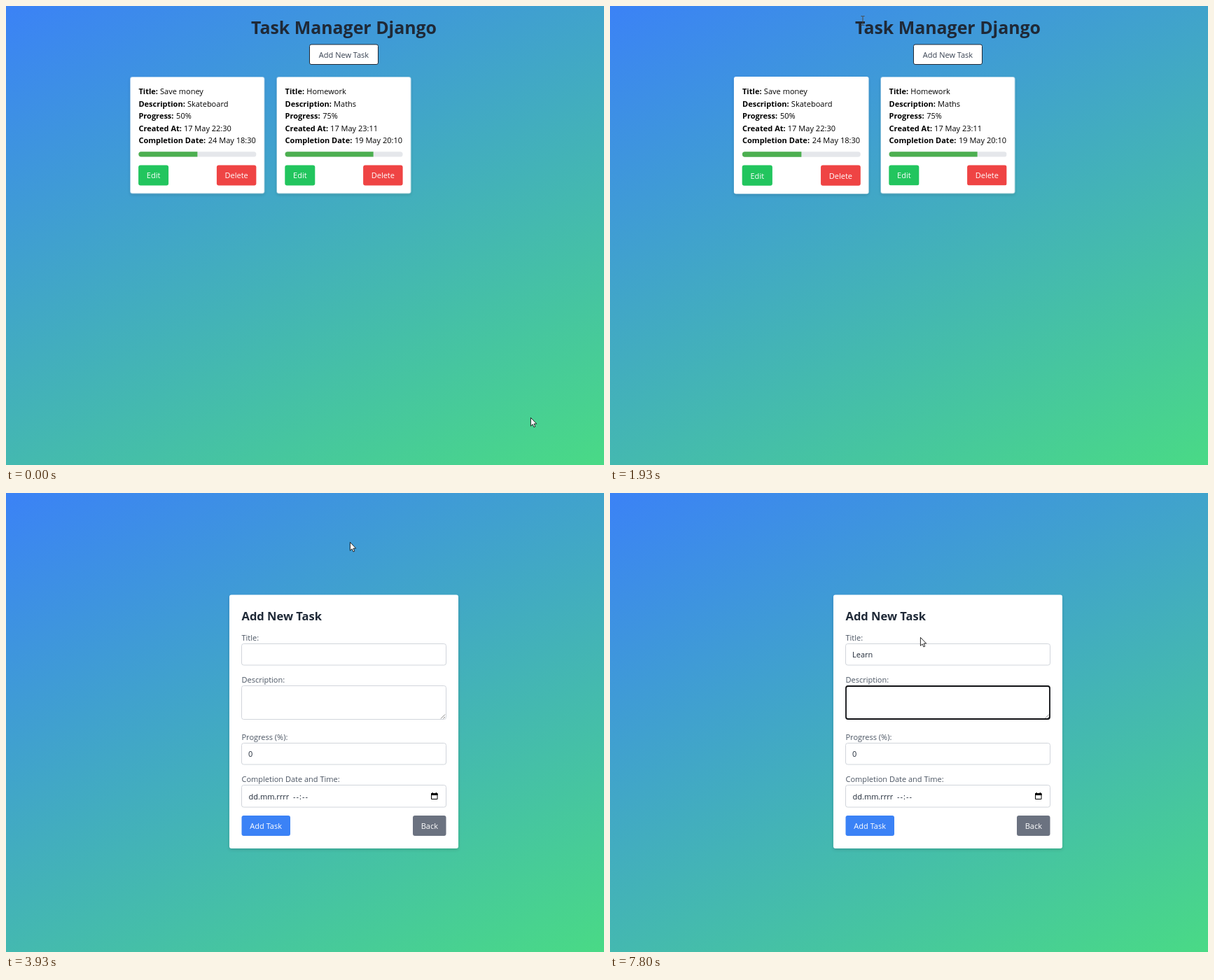
Animation of 854 by 656 pixels, one loop 8 s. Source, as an HTML page:

```html
<!DOCTYPE html>
<html lang="en">
<head>
<meta charset="utf-8">
<title>Task Manager</title>
<style>
  html, body { margin: 0; width: 100%; height: 100%; overflow: hidden; }
  body { background: linear-gradient(155deg, #3b82f6, #4ade80) 0 0 / 965px 656px no-repeat; }
  svg { display: block; }
  text { font: 11px "Open Sans", "Noto Sans", sans-serif; white-space: pre; }
  .mid { text-anchor: middle; }
  .white { fill: #fff; }
  .bold { font-weight: 700; }
  .h1 { font-size: 24.9px; font-weight: 700; fill: #1f2937; }
  .h2 { font-size: 16.5px; font-weight: 700; fill: #1f2937; }
  .label { fill: #4b5563; }
  .value { fill: #1f2937; }
  .field { fill: #fff; stroke: #d1d5db; }
  .ring { fill: none; stroke: #101114; stroke-width: 1.8; }
  .panel { fill: #fff; filter: drop-shadow(0 2px 2px rgba(0, 0, 0, .14)); }

  .card { transform-origin: 95.8px 83.3px; animation: grow 8s infinite; }
  .card .panel { animation: lift 8s infinite; }
  .late, .late .panel { animation-delay: .985s; }
  @keyframes grow {
    0%, 14.875%, 25.525%, 100% { transform: scale(1); animation-timing-function: cubic-bezier(.4, 0, .2, 1); }
    18.625%, 21.775% { transform: scale(1.05); animation-timing-function: cubic-bezier(.4, 0, .2, 1); }
  }
  @keyframes lift {
    0%, 14.875%, 25.525%, 100% { filter: drop-shadow(0 2px 2px rgba(0, 0, 0, .14)); }
    18.625%, 21.775% { filter: drop-shadow(0 6px 5px rgba(0, 0, 0, .16)); }
  }

  .add rect { fill: #fff; stroke: #1f2937; animation: darken 8s infinite; }
  .add text { fill: #374151; animation: lighten 8s infinite; }
  @keyframes darken { 0%, 35% { fill: #fff; } 36.3%, 100% { fill: #1f2937; } }
  @keyframes lighten { 0%, 35% { fill: #374151; } 36.3%, 100% { fill: #fff; } }

  #caret { animation: caret 8s step-end infinite; }
  @keyframes caret {
    0% { opacity: 0; transform: none; }
    57.5% { opacity: 1; transform: none; }
    64.125% { opacity: 0; transform: none; }
    70.875% { opacity: 1; transform: none; }
    75.875% { opacity: 1; transform: translateX(5.5px); }
    79.125% { opacity: 1; transform: translateX(11.7px); }
    81.625% { opacity: 1; transform: translateX(17.7px); }
    85% { opacity: 1; transform: translateX(22.1px); }
    87.5% { opacity: 1; transform: translateX(28.6px); }
    90.875% { opacity: 1; transform: translateY(60px); }
    97.5%, 100% { opacity: 0; transform: translateY(60px); }
  }

  #pointer { animation: point 8s linear infinite; }
  @keyframes point {
    0%, .5% { transform: translate(749px, 588px); animation-timing-function: cubic-bezier(.4, .1, .7, .95); }
    10.9% { transform: translate(49px, 264px); }
    11.7% { transform: translate(46px, 254px); animation-timing-function: ease-in; }
    14.875% { transform: translate(178px, 165px); }
    15.875% { transform: translate(255px, 129px); animation-timing-function: ease-out; }
    17.8%, 20% { transform: translate(276px, 122px); animation-timing-function: ease-in; }
    21.775% { transform: translate(332px, 101px); }
    23.3% { transform: translate(357px, 29px); animation-timing-function: ease-out; }
    24.125% { transform: translate(361px, 21px); animation-timing-function: ease-in; }
    27.19% { transform: translate(405px, 101px); animation-timing-function: ease-out; }
    30%, 32% { transform: translate(465px, 143px); animation-timing-function: ease-in; }
    34.1% { transform: translate(487px, 101px); animation-timing-function: ease-out; }
    36.5%, 49.2% { transform: translate(491px, 70px); animation-timing-function: ease-in-out; }
    56%, 61% { transform: translate(448px, 229px); animation-timing-function: ease-in-out; }
    64%, 100% { transform: translate(443px, 206px); }
  }
</style>
</head>
<body>
<svg width="854" height="656" viewBox="0 0 854 656">
  <g id="list">
    <text class="h1 mid" x="482.5" y="39.5">Task Manager Django</text>
    <g class="add">
      <rect x="433.5" y="55" width="98" height="28.5" rx="2.5"/>
      <text class="mid" x="482.5" y="74">Add New Task</text>
    </g>
    <g id="cards"></g>
  </g>

  <g id="form">
    <rect class="panel" x="319" y="145.5" width="327" height="362.5" rx="3"/>
    <text class="h2" x="336.5" y="182">Add New Task</text>

    <text class="label" x="336.5" y="211">Title:</text>
    <rect class="field" x="336.5" y="215.5" width="292" height="30.5" rx="3"/>
    <text class="value" id="typed" x="346" y="235"></text>

    <text class="label" x="336.5" y="271">Description:</text>
    <rect class="field" x="336.5" y="275.5" width="292" height="48" rx="3"/>
    <path d="M621 322.5l6-6M624.5 322.5l2.5-2.5" stroke="#777" stroke-width=".9"/>

    <text class="label" x="336.5" y="353">Progress (%):</text>
    <rect class="field" x="336.5" y="357.5" width="292" height="30.5" rx="3"/>
    <text class="value" x="346" y="377">0</text>

    <text class="label" x="336.5" y="413">Completion Date and Time:</text>
    <rect class="field" x="336.5" y="417.5" width="292" height="31.5" rx="3"/>
    <text class="value" x="346.5" y="437.5">dd.mm.rrrr</text>
    <text class="value" x="410" y="437.5" letter-spacing="1">--:--</text>
    <path d="M607.5 430h8.5v7.5h-8.5z" fill="none" stroke="#000"/>
    <path d="M607 429h9.5v3H607zM608.5 428h1.3v2h-1.3zM613.7 428h1.3v2h-1.3z"/>

    <rect x="336.5" y="461" width="69.5" height="29" rx="3" fill="#3b82f6"/>
    <text class="white mid" x="371.2" y="480">Add Task</text>
    <rect x="581" y="461" width="47.5" height="29" rx="3" fill="#6b7280"/>
    <text class="white mid" x="604.8" y="480">Back</text>

    <rect class="ring" id="titleRing" x="337" y="216" width="291" height="29.5" rx="3"/>
    <rect class="ring" id="textRing" x="337" y="276" width="291" height="47" rx="3"/>
    <rect id="caret" x="346" y="223" width="1" height="15"/>
  </g>

  <g id="pointer">
    <path id="arrow" d="M.4.4V12.3L3.1 9.8 4.9 13.9 6.8 13.1 5 9.1H8.7z" fill="#fff" stroke="#111" stroke-width=".9"/>
    <path id="beam" d="M-2.5-6.5h2L0-6l.5-.5h2M0-6V6M-2.5 6.5h2L0 6l.5.5h2" fill="none" stroke="#4a4a4a"/>
    <path id="hand" d="M2.6 8.5V.6a1.1 1.1 0 0 1 2.2 0V5a1 1 0 0 1 2 .1a1 1 0 0 1 2 .4a1 1 0 0 1 2 .6V10.5q0 2-1.2 3V15H3.6V13.6Q1.5 11.5-.2 8.6q-.3-1.6 1.3-1.2z" fill="#fff" stroke="#111" stroke-width=".9"/>
  </g>
</svg>
<script>
  const LOOP = 8000;
  const $ = id => document.getElementById(id);

  // Value offsets follow the bold labels, measured from the card's left edge.
  const labels = [['Title:', 42.7], ['Description:', 81.5], ['Progress:', 65.7], ['Created At:', 76.5], ['Completion Date:', 111.4]];

  function card(x, values, percent, late) {
    const rows = labels.map(([label, offset], i) => {
      const y = 25 + i * 17.5;
      return `<text class="bold" x="12" y="${y}">${label}</text><text x="${offset}" y="${y}">${values[i]}</text>`;
    }).join('');
    const fill = 168 * percent / 100;
    return `<g transform="translate(${x} 101.4)"><g class="card ${late}">
      <rect class="panel" width="191.6" height="166.6" rx="3"/>${rows}
      <rect x="12" y="106.8" width="168" height="7.3" rx="3.6" fill="#e5e7eb"/>
      <path d="M${12 + fill} 106.8H15.6a3.65 3.65 0 0 0 0 7.3H${12 + fill}z" fill="#4caf50"/>
      <rect x="11.7" y="126" width="43" height="29" rx="3" fill="#22c55e"/>
      <text class="white mid" x="33.2" y="145">Edit</text>
      <rect x="123.5" y="126" width="56.5" height="29" rx="3" fill="#ef4444"/>
      <text class="white mid" x="151.7" y="145">Delete</text>
    </g></g>`;
  }

  $('cards').innerHTML =
    card(177.4, ['Save money', 'Skateboard', '50%', '17 May 22:30', '24 May 18:30'], 50, '') +
    card(386.6, ['Homework', 'Maths', '75%', '17 May 23:11', '19 May 20:10'], 75, 'late');

  // Flips an element between hidden and shown at each given time (ms).
  function toggle(el, shown, ...times) {
    const steps = [0, ...times].map((t, i) => ({
      opacity: (i + shown) % 2, offset: t / LOOP, easing: 'step-end'
    }));
    steps.push({ opacity: steps[steps.length - 1].opacity, offset: 1 });
    el.animate(steps, { duration: LOOP, iterations: Infinity });
  }

  const keys = [6070, 6330, 6530, 6800, 7000];
  [...'Learn'].forEach((letter, i) => {
    const span = document.createElementNS('http://www.w3.org/2000/svg', 'tspan');
    span.textContent = letter;
    $('typed').append(span);
  });

  // Opacity does not apply to tspans, so the typed text changes its fill instead.
  [...$('typed').children].forEach((span, i) => span.animate([
    { fillOpacity: 0, offset: 0, easing: 'step-end' },
    { fillOpacity: 1, offset: keys[i] / LOOP },
    { fillOpacity: 1, offset: 1 }
  ], { duration: LOOP, iterations: Infinity }));

  toggle($('list'), 1, 3930);
  toggle($('form'), 0, 3930);
  toggle($('titleRing'), 0, 4600, 7270);
  toggle($('textRing'), 0, 7270);
  toggle($('arrow'), 1, 1230, 1740, 1860, 2000, 2230, 2720, 2800, 3600, 4340, 5000);
  toggle($('beam'), 0, 1230, 1740, 1860, 2000, 2230, 2720, 4340, 5000);
  toggle($('hand'), 0, 2800, 3600);
</script>
</body>
</html>
```
